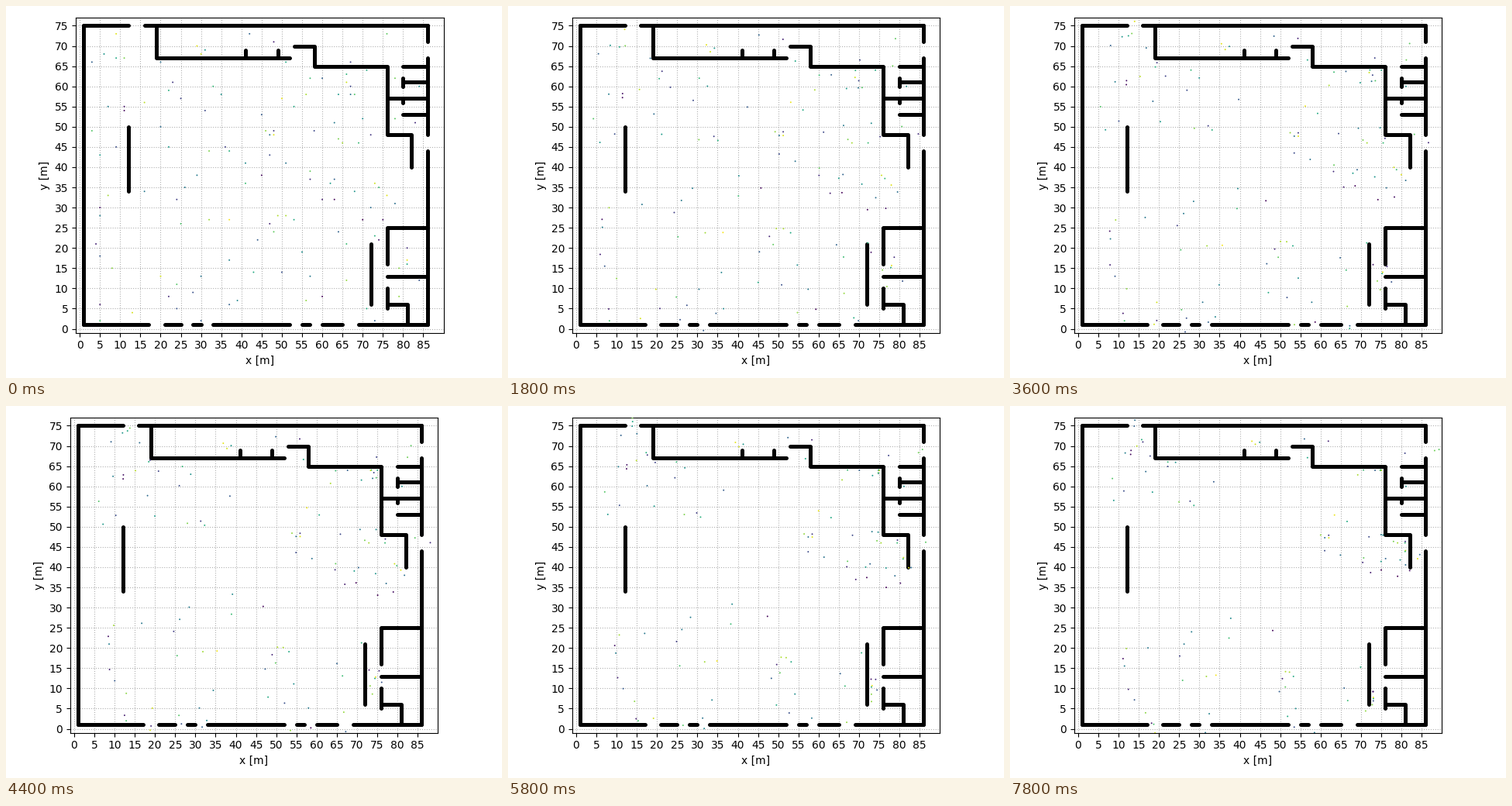
Recreate the animation shown at these times as a matplotlib script. Size 640 px wide and 480 px high, loop 8000 ms.

```python
import math
import random

import matplotlib.pyplot as plt
import numpy as np
from matplotlib.animation import FuncAnimation

FRAMES, INTERVAL = 40, 200
CROWD = 130
SPEED = 0.36      # metres walked per frame
CLEARANCE = 0.95  # closest distance to a wall
LEFT, RIGHT, BOTTOM, TOP = 1, 86, 1, 75

# gaps in the outer walls
SOUTH_GAPS = [(17, 21), (25, 28), (30, 33), (52, 55), (57, 60), (65, 69)]
NORTH_GAPS = [(12, 16)]
EAST_GAPS = [(44, 48), (67, 71)]

# rooms as x0, x1, y0, y1 with the door that leads out
ROOMS = [
    ((19, 53, 67, 75), (53, 72)),
    ((76, 86, 57, 65), (78, 65)),
    ((76, 86, 53, 57), (78, 52)),
    ((76, 86, 13, 25), (75.5, 14.5)),
    ((76, 86, 1, 13), (76, 11.5)),
]


def across(y, x0, x1):
    return [(x0, y), (x1, y)]


def upright(x, y0, y1):
    return [(x, y0), (x, y1)]


def side(wall, at, start, end, gaps):
    """Straight wall pieces between the gaps."""
    cuts = [start, *sum(gaps, ()), end]
    return [wall(at, a, b) for a, b in zip(cuts[::2], cuts[1::2])]


def build_walls():
    walls = [upright(LEFT, BOTTOM, TOP)]
    walls += side(across, BOTTOM, LEFT, RIGHT, SOUTH_GAPS)
    walls += side(across, TOP, LEFT, RIGHT, NORTH_GAPS)
    walls += side(upright, RIGHT, BOTTOM, TOP, EAST_GAPS)
    # top room and the stepped corridor beside it
    walls += [[(19, TOP), (19, 67), (52, 67)]]
    walls += [upright(x, 67, 69) for x in (41, 49)]
    walls += [[(53, 70), (58, 70), (58, 65), (76, 65),
               (76, 48), (82, 48), (82, 40)]]
    # cabins on the right
    walls += [across(y, 80, RIGHT) for y in (53, 61, 65)]
    walls += [across(57, 76, RIGHT), upright(80, 60, 62), upright(80, 56, 57)]
    # lower rooms and free-standing screens
    walls += [[(RIGHT, 25), (76, 25), (76, 16)], across(13, 76, RIGHT),
              upright(76, 5, 10), [(76, 6), (81, 6), (81, BOTTOM)]]
    walls += [upright(12, 34, 50), upright(72, 6, 21)]
    return walls


WALLS = build_walls()
SEGMENTS = [seg for line in WALLS for seg in zip(line, line[1:])]

# middle of each gap and a point far outside behind it
EXITS = [((sum(g) / 2, BOTTOM), (sum(g) / 2, BOTTOM - 40)) for g in SOUTH_GAPS]
EXITS += [((sum(g) / 2, TOP), (sum(g) / 2, TOP + 40)) for g in NORTH_GAPS]
EXITS += [((RIGHT, sum(g) / 2), (RIGHT + 40, sum(g) / 2)) for g in EAST_GAPS]


def blocked(x, y):
    for (x0, y0), (x1, y1) in SEGMENTS:
        if x0 == x1:
            if abs(x - x0) < CLEARANCE and min(y0, y1) <= y <= max(y0, y1):
                return True
        elif abs(y - y0) < CLEARANCE and min(x0, x1) <= x <= max(x0, x1):
            return True
    return False


def route(spot):
    """Door of the room, if any, then the nearest exit and outside."""
    x, y = spot
    doors = [door for (x0, x1, y0, y1), door in ROOMS
             if x0 < x < x1 and y0 < y < y1]
    last = doors[0] if doors else spot
    return doors + list(min(EXITS, key=lambda e: math.dist(e[0], last)))


def walk(spot):
    """Positions in every frame; a wall stops only the step across it."""
    stops, path = route(spot), []
    x, y = spot
    for _ in range(FRAMES):
        path.append((x, y))
        if math.dist(stops[0], (x, y)) < SPEED:
            stops.pop(0)
        gx, gy = stops[0]
        d = math.dist((gx, gy), (x, y))
        sx, sy = SPEED * (gx - x) / d, SPEED * (gy - y) / d
        for nx, ny in ((x + sx, y + sy), (x + sx, y), (x, y + sy)):
            if not blocked(nx, ny):
                x, y = nx, ny
                break
    return path


def scatter_people(seed):
    """Distinct whole-metre places, clear of the walls."""
    rng = random.Random(seed)
    spots = []
    while len(spots) < CROWD:
        spot = rng.randint(LEFT + 1, RIGHT - 1), rng.randint(BOTTOM + 1, TOP - 1)
        if spot not in spots and not blocked(*spot):
            spots.append(spot)
    return spots, [rng.random() for _ in spots]


spots, shades = scatter_people(12)
paths = np.array([walk(s) for s in spots])

fig, ax = plt.subplots(figsize=(6.4, 4.8), dpi=100)
ax.set(xlim=(-1, 90), ylim=(-1, 77), xlabel="x [m]", ylabel="y [m]",
       xticks=range(0, 90, 5), yticks=range(0, 80, 5), aspect="equal")
ax.grid(linestyle=":")
for line in WALLS:
    ax.plot(*zip(*line), color="black", lw=3.6,
            solid_capstyle="round", solid_joinstyle="round")
dots = ax.scatter(paths[:, 0, 0], paths[:, 0, 1], s=2, c=shades,
                  cmap="viridis", vmin=0, vmax=1, linewidths=0, zorder=3)

# the tight layout needs two passes to settle in the centre
layouts = []
for _ in range(2):
    fig.tight_layout()
    layouts.append(ax.get_position(original=True).frozen())


def update(i):
    ax.set_position(layouts[min(i, 1)])
    dots.set_offsets(paths[:, i])
    return [dots]


anim = FuncAnimation(fig, update, frames=FRAMES, interval=INTERVAL,
                     repeat=True, repeat_delay=0)
plt.show()
```
